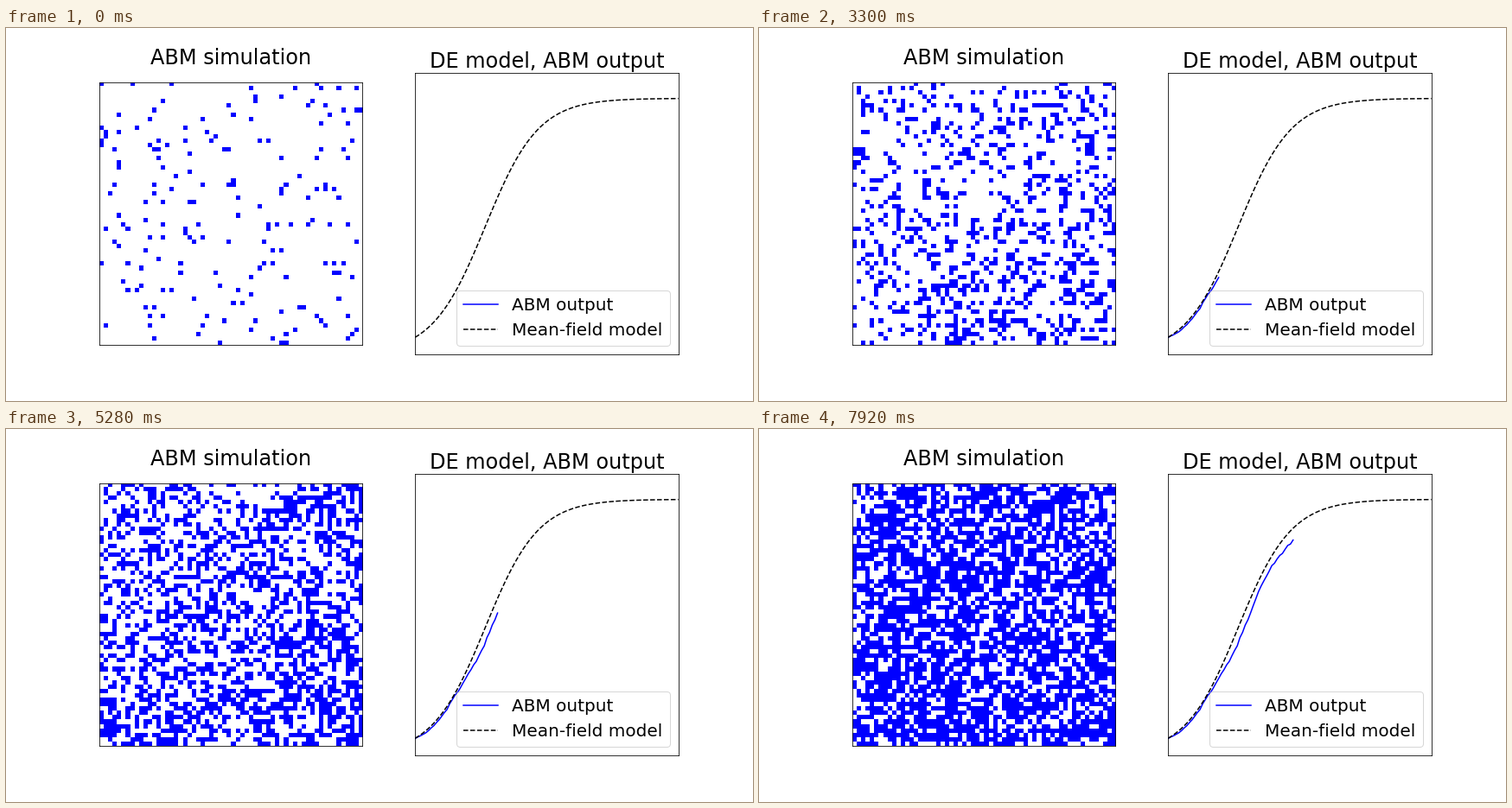
Write a matplotlib script that moves like this. It is 864 by 432 pixels and loops after 8000 ms.

```python
import random

import matplotlib.pyplot as plt
import numpy as np
from matplotlib.animation import FuncAnimation
from matplotlib.colors import ListedColormap

SIDE = 60                 # lattice cells per side
STEP, TICK, LOOP = 330, 40, 8000
P_BIRTH, P_DEATH = 0.01, 0.0025
CAPACITY, START = 0.75, 0.05
SPAN = 9.9                # time range in growth units

rng = random.Random(7)


def logistic(t):
    return CAPACITY / (1 + (CAPACITY / START - 1) * np.exp(-t))


time = np.linspace(0, SPAN, 100)
noise = np.array([rng.gauss(0, 0.015) for _ in time])
# The agents lag behind the mean field, with a slow wobble
output = logistic(0.93 * time - 0.06 * np.sin(3 * time) + noise)


def neighbour(cell):
    """Random lattice neighbour, or None beyond the wall."""
    row, col = divmod(cell, SIDE)
    drow, dcol = rng.choice(((0, 1), (0, -1), (1, 0), (-1, 0)))
    row, col = row + drow, col + dcol
    if 0 <= row < SIDE and 0 <= col < SIDE:
        return row * SIDE + col
    return None


def evolve(agents, taken, goal):
    """Move, divide and remove agents until the population reaches goal."""
    total = 1 + P_BIRTH + P_DEATH
    while len(agents) < goal:
        i = rng.randrange(len(agents))
        pick = rng.random() * total
        if pick < P_DEATH:
            taken[agents[i]] = 0
            agents[i] = agents[-1]
            agents.pop()
            continue
        spot = neighbour(agents[i])
        if spot is None or taken[spot]:
            continue
        taken[spot] = 1
        if pick < P_DEATH + P_BIRTH:
            agents.append(spot)
        else:
            taken[agents[i]] = 0
            agents[i] = spot


def simulate(steps):
    cells = SIDE * SIDE
    agents = rng.sample(range(cells), round(START * cells))
    taken = [0] * cells
    for cell in agents:
        taken[cell] = 1
    grids = []
    for k in range(steps):
        evolve(agents, taken, round(output[2 * k] * cells))
        grids.append(np.array(taken).reshape(SIDE, SIDE))
    return grids


grids = simulate(LOOP // STEP + 1)

plt.rcParams["font.family"] = "DejaVu Sans"
fig = plt.figure(figsize=(12, 6), dpi=72, facecolor="white")
fig.subplots_adjust(left=0.125, right=0.9, bottom=0.125, top=0.88, wspace=0.2)
ax_grid, ax_curve = fig.subplots(1, 2)

image = ax_grid.imshow(grids[0], cmap=ListedColormap(["white", "blue"]),
                       vmin=0, vmax=1, interpolation="nearest")
ax_grid.set_title("ABM simulation", fontsize=24, y=1.05)

line, = ax_curve.plot([], [], "b-", lw=1.5, label="ABM output")
ax_curve.plot(time, logistic(time), "k--", lw=1.5, label="Mean-field model")
ax_curve.set(xlim=(0, SPAN), ylim=(0, 1.1 * CAPACITY))
ax_curve.set_title("DE model, ABM output", fontsize=24, y=1.0)
ax_curve.legend(loc="lower right", fontsize=20)

for ax in (ax_grid, ax_curve):
    ax.set(xticks=[], yticks=[])


def update(i):
    k = (i * TICK + TICK - 1) // STEP
    image.set_data(grids[k])
    line.set_data(time[:2 * k], output[:2 * k])
    return image, line


anim = FuncAnimation(fig, update, frames=LOOP // TICK, interval=TICK,
                     init_func=lambda: update(0), repeat=True, repeat_delay=0)
plt.show()
```
